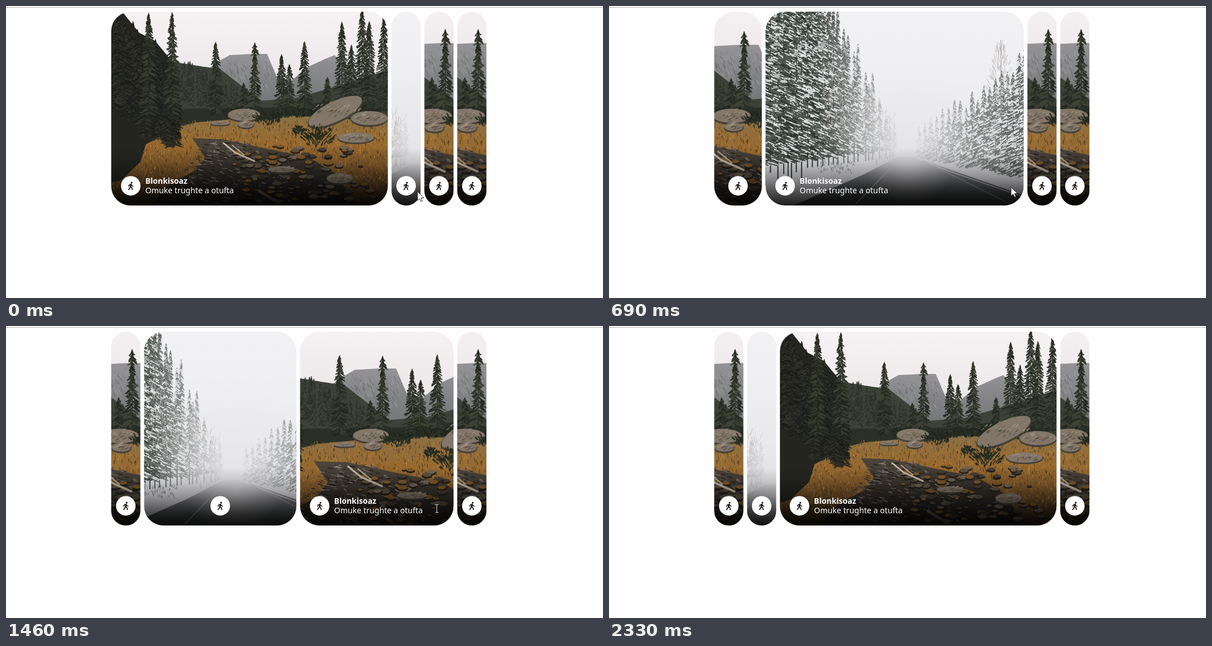
These frames come from a looping animation (1069x524 px, 3.03 s). An HTML page with a canvas:

```html
<!DOCTYPE html>
<html lang="en">
<head>
<meta charset="utf-8">
<title>Expanding cards</title>
<style>
html, body { margin: 0; width: 100%; height: 100%; overflow: hidden; background: #fefefe; }
canvas { display: block; }
</style>
</head>
<body>
<canvas id="stage" width="1069" height="524"></canvas>
<script>
const ctx = document.getElementById('stage').getContext('2d');
const LOOP = 3030, STEP = 76.6;
const TOP = 10.3, HEIGHT = 347.6, LEFT = 188.4, GAP = 6.65;
const CLOSED = 52.2, OPEN = 495.3, RADIUS = 34.8;
const PIC = { w: 522, h: 348, pad: 13.4, res: 1.5 };

const MOVES = [
  { from: 0, to: 1, start: 472, dur: 460 },
  { from: 1, to: 2, start: 1383, dur: 515 }
];
const PATH = [
  { t: 0, x: 737, y: 333 }, { t: 76, x: 727, y: 323 }, { t: 229, x: 720, y: 325 },
  { t: 920, x: 720, y: 325 }, { t: 995, x: 735, y: 322 }, { t: 1225, x: 771, y: 327 },
  { t: 2010, x: 771, y: 327 }, { t: 2330, x: 1030, y: 570 }
];

const clamp = (v, lo, hi) => Math.min(hi, Math.max(lo, v));
const lerp = (a, b, t) => a + (b - a) * t;
const mix = (a, b, t) => `rgb(${a.map((v, i) => Math.round(lerp(v, b[i], t)))})`;

function ease(u) {
  if (u <= 0) return 0;
  if (u >= 1) return 1;
  const curve = (s, a, b) => 3 * (1 - s) * (1 - s) * s * a + 3 * (1 - s) * s * s * b + s * s * s;
  let lo = 0, hi = 1;
  for (let i = 0; i < 24; i++) {
    const mid = (lo + hi) / 2;
    if (curve(mid, 0.05, 0.41) < u) lo = mid; else hi = mid;
  }
  return curve(lo, 0.61, 0.95);
}

function seeded(seed) {
  return (lo = 0, hi = 1) => {
    seed = (seed * 1664525 + 1013904223) >>> 0;
    return lo + (hi - lo) * seed / 4294967296;
  };
}

function trace(g, pts) {
  g.beginPath();
  for (let i = 0; i < pts.length; i += 2) g.lineTo(pts[i], pts[i + 1]);
}

function poly(g, fill, ...pts) {
  trace(g, pts);
  g.fillStyle = fill;
  g.fill();
}

function line(g, color, width, ...pts) {
  trace(g, pts);
  g.strokeStyle = color;
  g.lineWidth = width;
  g.stroke();
}

function blob(g, fill, x, y, rx, ry, tilt = 0) {
  g.fillStyle = fill;
  g.beginPath();
  g.ellipse(x, y, rx, ry, tilt, 0, Math.PI * 2);
  g.fill();
}

function fade(g, x0, y0, x1, y1, ...colors) {
  const f = g.createLinearGradient(x0, y0, x1, y1);
  colors.forEach((c, i) => f.addColorStop(i / (colors.length - 1), c));
  return f;
}

function glow(g, x, y, r, rgb, alpha) {
  const f = g.createRadialGradient(x, y, 0, x, y, r);
  for (const k of [0, 0.5, 1]) f.addColorStop(k, `rgba(${rgb},${alpha * (1 - k) ** 1.3})`);
  g.fillStyle = f;
  g.fillRect(x - r, y - r, 2 * r, 2 * r);
}

const times = (n, fn) => { for (let i = 0; i < n; i++) fn(i); };
const pick = (rnd, list) => list[Math.floor(rnd(0, list.length))];

// Branches droop from a trunk; their colours come at random from the list.
function conifer(g, rnd, x, top, base, half, colors) {
  line(g, colors[0], 1.5, x, top, x, base);
  for (let y = top + 3; y < base; y += 1.5) {
    const reach = half * Math.pow((y - top) / (base - top), 0.6);
    for (const side of [-1, 1]) {
      const len = reach * rnd(0.25, 1);
      line(g, pick(rnd, colors), 1.8, x + side * len * rnd(0, 0.5), y - 1, x + side * len, y + 1 + len * 0.15);
    }
  }
}

function bush(g, rnd, x, y, rx, ry) {
  times(rx * 7, () => {
    const a = rnd(0, Math.PI * 2), d = rnd();
    const px = x + Math.cos(a) * d * rx, py = y + Math.sin(a) * d * ry;
    line(g, pick(rnd, ['#252b21', '#30362a', '#1f241c']), 1.5, px, py, px + Math.cos(a) * 3, py - 3);
  });
}

function boulder(g, rnd, x, y, rx, ry, tilt = 0) {
  blob(g, '#463f36', x, y + 2, rx, ry, tilt);
  blob(g, '#82776a', x, y, rx * 0.97, ry * 0.9, tilt);
  times(rx * 1.5, () => {
    const a = rnd(0, Math.PI * 2), d = rnd(0, 0.8);
    const px = x + Math.cos(a) * d * rx, py = y + Math.sin(a) * d * ry;
    line(g, pick(rnd, py < y ? ['#a09486', '#8f8374', '#75695b'] : ['#6b6053', '#7b6f61', '#574d42']), 1.3, px, py, px + 4, py - 2 - tilt * -3);
  });
}

function picture(draw, seed) {
  const c = document.createElement('canvas');
  c.width = PIC.w * PIC.res;
  c.height = PIC.h * PIC.res;
  const g = c.getContext('2d');
  g.scale(PIC.res, PIC.res);
  g.translate(PIC.pad, 0);
  g.lineCap = 'round';
  draw(g, seeded(seed));
  return c;
}

function drawValley(g, rnd) {
  g.fillStyle = fade(g, 0, 0, 0, 130, '#f7f3f4', '#ebe7e8');
  g.fillRect(-14, 0, 523, 348);

  // mountains
  const stone = fade(g, 0, 76, 0, 170, '#949396', '#737475');
  poly(g, stone, 140, 130, 187, 92, 212, 78, 250, 76, 279, 76, 296, 116, 320, 130, 320, 190, 140, 190);
  poly(g, stone, 310, 135, 350, 100, 385, 84, 400, 78, 440, 120, 440, 190, 310, 190);
  times(160, () => {
    const x = rnd(205, 282), y = rnd(84, 135);
    line(g, pick(rnd, ['#858588', '#6e6f71', '#98989a']), 1, x, y, x + 3, y + rnd(3, 9));
  });

  // wooded slopes
  const woods = ['#343a31', '#41463d', '#2b3028'];
  poly(g, '#3d4239', 80, 85, 160, 98, 195, 103, 268, 160, 330, 155, 400, 135, 509, 100, 509, 205, 80, 215);
  times(80, () => {
    const x = rnd(85, 250), y = 88 + Math.max(0, x - 140) * 0.45 + rnd(0, 40);
    conifer(g, rnd, x, y, y + 42, 5, woods);
  });
  poly(g, '#2b3026', 90, 175, 300, 172, 400, 160, 509, 155, 509, 210, 90, 212);

  // meadow
  poly(g, fade(g, 0, 185, 0, 348, '#8b7146', '#98692f', '#71502a', '#3a2a1c'),
    -14, 240, 100, 212, 150, 199, 270, 188, 330, 187, 509, 197, 509, 348, -14, 348);
  times(2600, () => {
    const x = rnd(-10, 505), y = rnd(198, 320);
    line(g, pick(rnd, ['#b48440', '#94652a', '#a87431', '#654a27', '#43351f']), 0.9, x, y, x + rnd(-2, 2), y - rnd(2, 6));
  });

  // forest in shade
  const shade = ['#20221d', '#2a2b25', '#34352c', '#1b1c18'];
  poly(g, '#24251f', -14, 0, 22, 3, 50, 38, 78, 52, 118, 100, 122, 195, 92, 222, 62, 238, 52, 270, 18, 302, -14, 310);
  times(60, () => {
    const x = rnd(-12, 116), y = Math.max(-25, x * 0.8 - 15) + rnd(0, 70);
    conifer(g, rnd, x, y, y + rnd(90, 135), 13, shade);
  });

  // standing trees: position and top
  const needles = ['#282d24', '#343a2e', '#22261f', '#3f4436'];
  const trees = [[67, 3], [109, 2], [187, 55], [237, 128], [305, 77], [319, 95], [346, 54], [387, 118],
    [413, 19], [430, 60], [449, -3], [462, 18], [488, 9], [503, 40]];
  trees.forEach(([x, top]) => conifer(g, rnd, x, top, 185, 11 + (185 - top) * 0.05, needles));
  conifer(g, rnd, 257, 56, 78, 8, needles);
  conifer(g, rnd, 257, 74, 172, 16, needles);
  times(9, i => bush(g, rnd, 215 + i * 30, rnd(180, 188), 18, 8));

  // boulders
  boulder(g, rnd, 238, 185, 30, 12);
  boulder(g, rnd, 462, 191, 34, 14);
  boulder(g, rnd, 241, 202, 15, 7);
  boulder(g, rnd, 195, 200, 18, 4);
  boulder(g, rnd, 438, 226, 33, 10);
  boulder(g, rnd, 401, 179, 54, 20, -0.45);
  bush(g, rnd, 280, 192, 25, 12);
  bush(g, rnd, 370, 224, 30, 20);
  bush(g, rnd, 335, 214, 9, 9);

  // stream, stones and driftwood
  poly(g, fade(g, 0, 225, 0, 348, '#4f473d', '#332e29', '#1f1c1a'),
    145, 227, 200, 229, 298, 250, 355, 262, 400, 290, 440, 348, 70, 348, 105, 310, 150, 285, 168, 262);
  times(420, () => {
    const y = rnd(232, 345), t = (y - 228) / 120;
    const x = 165 - 75 * t + rnd(0, 75 + 190 * t);
    line(g, pick(rnd, ['#69635c', '#4a443e', '#292522', '#857e76', '#1e1b19']), rnd(0.8, 1.8), x, y, x + rnd(2, 9), y + rnd(0, 3));
  });
  times(120, () => {
    const y = rnd(240, 342), x = 205 + (y - 240) * 0.4 + rnd(0, 230), r = rnd(3, 9);
    blob(g, '#241f1a', x, y + 2, r + 1, r * 0.55);
    blob(g, pick(rnd, ['#5b5043', '#706353', '#463d33', '#7c5729']), x, y, r, r * 0.45);
  });
  boulder(g, rnd, 305, 283, 25, 6);
  boulder(g, rnd, 409, 299, 24, 10);
  line(g, '#bfb39f', 3.2, 201, 236, 222, 253, 256, 268);
  line(g, '#ada08b', 2.2, 217, 240, 238, 257);
  line(g, '#6f665b', 5, 265, 322, 302, 345);
}

function drawRoad(g, rnd) {
  const fog = [222, 221, 224], dark = [40, 47, 42], green = [76, 85, 77], snow = [226, 229, 231];
  const tones = (d, white) => [mix(dark, fog, d), mix(green, fog, d), mix(green, fog, d * 0.8), ...Array(white).fill(mix(snow, fog, d))];

  g.fillStyle = fade(g, 0, 0, 0, 262, '#f2f1f3', '#efeef0', '#e3e2e5');
  g.fillRect(-14, 0, 523, 348);
  poly(g, fade(g, 0, 250, 0, 348, '#dedee1', '#e9e9ed', '#dcdde1'), -14, 262, 252, 257, 285, 257, 509, 285, 509, 348, -14, 348);

  // far to near: the haze thins away from the vanishing point
  times(30, i => {
    const k = i / 29, x = 248 - 258 * k + rnd(-3, 3);
    const d = clamp(0.88 - k * 1.55, 0.02, 0.9);
    const top = Math.max(-70, (x - 152) * 2.1 + rnd(-10, 25)), base = 258 + (250 - x) * 0.12;
    conifer(g, rnd, x, top, base - 14, 7 + 17 * k, tones(d, k > 0.3 ? 1 : 2));
    line(g, mix(dark, fog, d), 1.8, x, base - 40, x, base + (k > 0.6 ? rnd(0, 30) : 0));
  });
  times(22, i => {
    const k = i / 21, x = 290 + 215 * k;
    const d = clamp(0.85 - k * 0.75, 0.08, 0.9);
    const top = 205 - 70 * k - 110 * k ** 6 - rnd(0, 50) * Math.sqrt(k), base = 259 + 40 * k;
    conifer(g, rnd, x, top, base, 7 + 14 * k, tones(d, 2));
  });

  // snow lying on the near branches
  times(110, i => {
    const near = i % 3, x = near ? rnd(-10, 130) : rnd(415, 505);
    const y = near ? rnd(20, 150) : rnd(110, 250);
    blob(g, mix(snow, dark, rnd(0, 0.35)), x, y, rnd(1, 7), rnd(0.8, 2.6), rnd(-0.5, 0.5));
  });

  // bare birch and twigs
  line(g, '#a5a3a2', 1.3, 432, 55, 432, 190);
  times(170, () => {
    const t = rnd(), x = 432 + rnd(-1, 1) * (5 + 28 * t), y = 62 + t * 115;
    line(g, '#b7b4b3', 0.6, x, y, x + (x - 432) * 0.25, y - rnd(4, 10));
  });
  times(260, () => {
    const x = rnd(130, 248), y = 110 + (x - 145) * 0.8 + rnd(0, 110);
    line(g, pick(rnd, ['#aca7a3', '#c9c7c7', '#bdb7b1']), 0.7, x, y, x + rnd(-5, 5), y - 10);
  });
  times(60, () => {
    const x = rnd(115, 180), y = rnd(268, 288);
    line(g, '#8b8e8a', 0.8, x, y, x + rnd(-3, 3), y - 4);
  });

  // road
  poly(g, fade(g, 0, 257, 0, 348, '#cfced1', '#858688', '#5a5c5e', '#454749'),
    253, 258, 281, 258, 509, 338, 509, 348, 60, 348, 193, 289);
  glow(g, 272, 272, 75, '214,213,216', 0.75);
  line(g, '#dcdcdf', 1.4, 281, 259, 340, 282, 495, 336);
  line(g, '#b6b6b9', 1.2, 297, 265, 455, 343);
  line(g, '#b9b9bc', 1.4, 243, 275, 172, 348);
  glow(g, 267, 215, 120, '233,232,235', 0.75);
}

const valley = picture(drawValley, 7), road = picture(drawRoad, 21);
const cards = [valley, road, valley, valley];

function walker(x, y) {
  blob(ctx, '#fff', x, y, 17.5, 17.5);
  ctx.save();
  ctx.translate(x, y);
  ctx.lineCap = ctx.lineJoin = 'round';
  blob(ctx, '#111', 1.5, -5.6, 1.6, 1.6);
  line(ctx, '#111', 2.6, 0.3, -2.3, -0.5, 1.6);
  line(ctx, '#111', 1.5, -3.8, 0.8, -3, -1.4, 0.6, -2.8, 2.2, -0.2, 4.2, 0.7);
  line(ctx, '#111', 1.7, -0.3, 1.5, 2, 3.6, 2.8, 6.8);
  line(ctx, '#111', 1.7, -0.9, 2, -2, 4.7, -4, 6.7);
  ctx.restore();
}

function label(text, font, x, y) {
  ctx.fillStyle = '#fff';
  ctx.font = `${font} "Noto Sans", sans-serif`;
  ctx.fillText(text, x, y);
}

function drawCard(image, x, w, open, active) {
  const bottom = TOP + HEIGHT, scale = 1.2 - 0.2 * open;
  const iw = PIC.w * scale, ih = PIC.h * scale;
  ctx.save();
  ctx.beginPath();
  ctx.roundRect(x, TOP, w, HEIGHT, Math.min(w / 2, RADIUS));
  ctx.clip();
  ctx.drawImage(image, x + (w - iw) / 2, TOP + (HEIGHT - ih) / 2, iw, ih);
  ctx.fillStyle = fade(ctx, 0, bottom - 104, 0, bottom,
    'rgba(0,0,0,0)', 'rgba(0,0,0,.13)', 'rgba(0,0,0,.37)', 'rgba(0,0,0,.64)', 'rgba(0,0,0,.87)');
  ctx.fillRect(x, bottom - 104, w, 104);
  walker(active ? x + 35 : x + w / 2, 322.7);
  if (active) {
    label('Blonkisoaz', 'bold 14px', x + 61, 319);
    label('Omuke trughte a otufta', '14.2px', x + 61, 335.7);
  }
  ctx.restore();
}

function drawPointer(t) {
  const next = PATH.findIndex(p => p.t > t);
  if (next < 0) return;
  const a = PATH[next - 1], b = PATH[next], k = (t - a.t) / (b.t - a.t);
  ctx.save();
  ctx.translate(Math.round(lerp(a.x, b.x, k)), Math.round(lerp(a.y, b.y, k)));
  if (t < 1225 || t > 2010) {
    poly(ctx, '#fff', 0, 0, 0, 16, 3.7, 12.6, 6.2, 18, 8.6, 17, 6.2, 11.6, 11, 11.4);
    ctx.closePath();
    ctx.strokeStyle = '#222';
    ctx.lineWidth = 0.9;
    ctx.stroke();
  } else {
    line(ctx, '#d8d8d8', 1, 0.5, -6, 0.5, 7);
    for (const y of [-6.5, 7.5]) line(ctx, '#d8d8d8', 1, -2.5, y, 3.5, y);
  }
  ctx.restore();
}

function render(t) {
  const open = [1, 0, 0, 0];
  let active = 0;
  for (const m of MOVES) {
    if (t < m.start) continue;
    const p = ease((t - m.start) / m.dur);
    open[m.from] = 1 - p;
    open[m.to] = p;
    active = m.to;
  }
  ctx.fillStyle = '#fefefe';
  ctx.fillRect(0, 0, 1069, 524);
  ctx.fillStyle = '#b5b3b6';
  ctx.fillRect(0, 2, 1069, 1);
  let x = LEFT;
  cards.forEach((image, i) => {
    const w = clamp((OPEN + CLOSED) * open[i], CLOSED, OPEN);
    drawCard(image, x, w, open[i], i === active);
    x += w + GAP;
  });
  drawPointer(t);
}

// The motion advances in coarse steps.
const began = performance.now();
function tick() {
  const t = (performance.now() - began) % LOOP;
  render(Math.floor(t / STEP) * STEP);
  requestAnimationFrame(tick);
}
tick();
</script>
</body>
</html>
```
